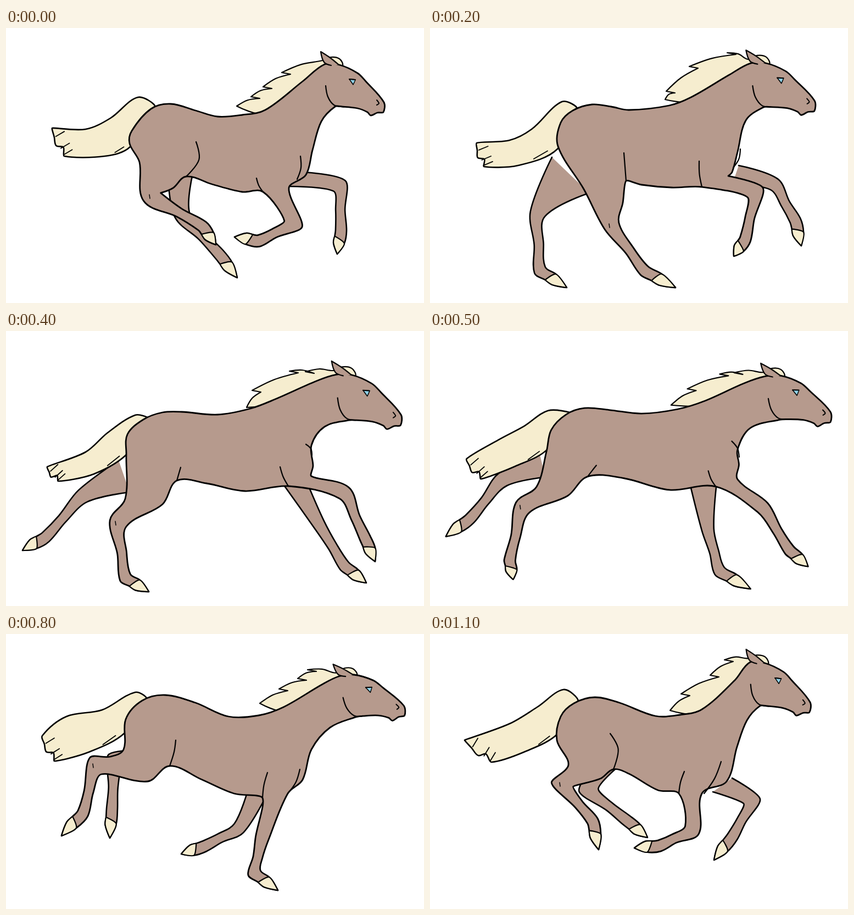
Animation, 761 px wide and 500 px high, one loop 1200 ms. Source, as an HTML page with a canvas:

```html
<!DOCTYPE html>
<html lang="en">
<head>
<meta charset="utf-8">
<title>Galloping horse</title>
<style>
html, body { margin: 0; width: 100%; height: 100%; overflow: hidden; background: #fff; }
canvas { display: block; }
</style>
</head>
<body>
<canvas id="stage" width="761" height="500"></canvas>
<script>
const COAT = '#b69a8d', CREAM = '#f6edcf', INK = '#000', IRIS = '#8fd3ea';
const STEPS = 12, STEP_MS = 100;
const ctx = document.getElementById('stage').getContext('2d');
const keys = [];

const nums = text => text.split(' ').map(Number);
const points = flat => flat.reduce((out, v, i) => (i % 2 ? out.at(-1).push(v) : out.push([v]), out), []);
const mix = (a, b, t) => [a[0] + (b[0] - a[0]) * t, a[1] + (b[1] - a[1]) * t];
const shift = (p, d, k = 1) => [p[0] + d[0] * k, p[1] + d[1] * k];
const gap = (a, b) => Math.hypot(b[0] - a[0], b[1] - a[1]) || 1;
const toward = (a, b) => [(b[0] - a[0]) / gap(a, b), (b[1] - a[1]) / gap(a, b)];
const side = d => [-d[1], d[0]];
const bulge = (a, b, t, k) => shift(mix(a, b, t), side(toward(a, b)), k);

// The head keeps its shape; each pose only places its poll and nose.
const POLL = [607, 67], NOSE = [688, 135];
const face = {
  outline: '599 143 612 143 640 146 658 153 664 159 676 154 687 153 688 135 655 97 640 82 607 67 580 66',
  ear: '592 68 579 62 573 43 590 54 606 67',
  forelock: '613 68 607 56 592 53 576 59',
  jaw: '582 105 586 125 597 140 612 143',
  eye: '625 93 636 94 632 103',
  nostril: '675 131 679 137 675 140'
};
for (const name in face) face[name] = points(nums(face[name]));

// hind: rump, buttock, gaskin, hock, fetlock, toe, gaskin front, stifle
// fore: elbow, knee, fetlock, toe, chest; far legs: root, joints, toe, root
function pose(step, parts) {
  for (const name in parts) parts[name] = nums(parts[name]);
  keys.push({ step, parts });
}

pose(0, {
  hind: '229 187 225 210 243 244 266 307 357 360 382 394 304 291 328 270',
  belly: '375 284 430 298',
  fore: '468 298 523 356 460 387 416 380 515 291',
  chest: '546 267 558 222 574 170', head: '607 67 688 135',
  top: '540 97 472 149 430 158 385 161 345 150 300 138 264 147',
  farHind: '296 285 321 340 387 410 421 454 340 265',
  farFore: '512 288 607 287 610 368 603 411 540 262',
  tail: '240 126 190 164 145 184 84 182 106 233 180 233 226 216',
  mane: '502 81 468 107 446 125 420 142',
  shoulder: '456 273', stifle: '346 207 14', brisket: '536 233 530 275'
});
pose(2, {
  hind: '238 172 233 215 280 293 331 360 390 441 447 472 351 318 357 278',
  belly: '385 285 440 290',
  fore: '495 289 592 299 574 384 553 415 543 269',
  chest: '550 262 560 225 575 168', head: '612 64 700 132',
  top: '545 85 475 126 435 141 362 149 330 143 295 139 260 150',
  farHind: '222 235 196 338 200 440 249 472 290 300',
  farFore: '550 285 626 284 665 350 676 396 562 250',
  tail: '240 134 185 184 145 204 85 209 98 252 160 250 232 220',
  mane: '541 45 472 70 430 115 428 130',
  shoulder: '490 242', stifle: '353 227 0', brisket: '565 220 552 254'
});
pose(4, {
  hind: '221 188 219 225 217 305 204 350 217 448 260 474 285 315 311 272',
  belly: '365 277 435 291',
  fore: '514 282 615 294 654 377 672 419 556 264',
  chest: '559 245 556 208 580 174', head: '630 80 719 152',
  top: '565 91 490 124 445 141 385 152 320 147 285 148 250 161',
  farHind: '205 235 140 300 72 375 30 399 225 293',
  farFore: '500 272 569 350 616 427 656 458 550 280',
  tail: '235 153 185 185 145 220 75 247 95 273 160 260 222 222',
  mane: '545 74 516 73 448 108 438 139',
  shoulder: '499 247', stifle: '318 248 0', brisket: '546 206 557 226'
});
pose(6, {
  hind: '222 168 208 210 180 256 151 287 100 378 70 422 228 283 272 256',
  belly: '345 260 435 287',
  fore: '518 286 580 352 623 422 668 440 557 278',
  chest: '562 245 563 225 585 178', head: '645 80 735 138',
  top: '575 98 510 130 455 144 385 148 335 138 280 129 247 139',
  farHind: '200 215 140 243 101 316 70 359 205 240',
  farFore: '450 280 447 363 435 430 492 464 492 280',
  tail: '200 131 160 158 105 171 60 210 90 259 150 229 208 205',
  mane: '560 73 533 83 488 103 441 129',
  shoulder: '509 260', stifle: '294 233 0', brisket: '553 202 562 242'
});
pose(8, {
  hind: '218 155 214 210 190 223 163 240 140 326 101 367 258 268 298 240',
  belly: '355 264 415 290',
  fore: '467 298 466 372 452 434 495 466 513 290',
  chest: '540 265 556 210 590 170', head: '633 74 724 130',
  top: '575 92 505 133 460 148 405 150 345 125 290 111 248 121',
  farHind: '220 212 198 232 193 318 189 371 225 245',
  farFore: '440 285 424 353 361 386 319 400 475 292',
  tail: '235 106 175 138 110 150 66 185 88 231 150 215 216 180',
  mane: '549 65 531 81 497 100 462 126',
  shoulder: '476 252', stifle: '309 193 2', brisket: '535 246 513 290'
});
pose(10, {
  hind: '232 140 221 183 239 234 206 262 235 343 229 395 300 263 322 243',
  belly: '355 261 410 287',
  fore: '442 294 448 361 388 399 345 423 481 300',
  chest: '530 287 553 222 577 172', head: '618 60 703 122',
  top: '565 83 495 136 455 150 392 151 345 127 295 113 262 120',
  farHind: '250 255 261 272 299 342 325 386 280 250',
  farFore: '482 298 519 347 454 391 408 402 525 280',
  tail: '243 98 195 130 145 155 52 177 102 221 165 209 222 180',
  mane: '541 41 510 82 458 108 445 142',
  shoulder: '453 248', stifle: '320 181 6', brisket: '521 242 481 302'
});
pose(11, {
  hind: '238 150 231 193 252 238 241 274 296 340 307 392 310 263 334 246',
  belly: '362 254 415 284',
  fore: '453 290 477 356 418 385 372 389 495 290',
  chest: '540 268 559 205 577 157', head: '610 53 692 124',
  top: '555 84 495 137 455 147 410 149 345 125 300 115 262 126',
  farHind: '285 255 289 284 357 338 396 370 338 245',
  farFore: '515 287 586 304 551 368 517 411 550 262',
  tail: '243 101 195 133 145 163 63 193 112 233 175 213 232 182',
  mane: '536 47 510 75 457 109 437 139',
  shoulder: '463 250', stifle: '328 181 12', brisket: '530 232 499 290'
});

const keyAt = i => keys[(i + keys.length) % keys.length];

function slope(i, name, j) {
  const prev = keyAt(i - 1), next = keyAt(i + 1);
  const span = (next.step - prev.step + STEPS) % STEPS;
  return (next.parts[name][j] - prev.parts[name][j]) / span;
}

// Steps between two key poses lie halfway along a cubic through the keys.
function partsAt(step) {
  const i = keys.findLastIndex(k => k.step <= step);
  const a = keyAt(i), b = keyAt(i + 1);
  if (a.step === step) return a.parts;
  const parts = {};
  for (const name in a.parts) {
    parts[name] = a.parts[name].map((v, j) =>
      (v + b.parts[name][j]) / 2 + (slope(i, name, j) - slope(i + 1, name, j)) / 4);
  }
  return parts;
}

// Contour of a leg below its root, from the joints and fixed thicknesses.
function limb(root, knee, fetlock, toe, kneeHalf) {
  const down = toward(root, knee), shin = toward(knee, fetlock), foot = toward(fetlock, toe);
  const pair = (p, d1, d2, half) => {
    const sum = [d1[0] + d2[0], d1[1] + d2[1]];
    const size = Math.hypot(...sum) || 1;
    const n = side([sum[0] / size, sum[1] / size]);
    const reach = half / Math.max(0.7, size / 2);
    return [shift(p, n, reach), shift(p, n, -reach)];
  };
  const tilt = 28 * Math.PI / 180, c = Math.cos(tilt), s = Math.sin(tilt);
  const sole = [foot[0] * c - foot[1] * s, foot[0] * s + foot[1] * c];
  const rows = [
    pair(knee, down, shin, kneeHalf),
    pair(mix(knee, fetlock, 0.55), shin, shin, 8.5),
    pair(fetlock, shin, foot, 10),
    pair(mix(fetlock, toe, 0.4), sole, sole, 11)
  ];
  const back = rows.map(r => r[0]), front = rows.map(r => r[1]).reverse();
  const heel = bulge(back[3], toe, 0.35, 4);
  return { contour: [...back, heel, toe, ...front], hoof: [back[3], heel, toe, front[0]] };
}

function farLimb(flat, kneeHalf) {
  const [a, knee, fetlock, toe, b] = points(flat);
  const leg = limb(mix(a, b, 0.5), knee, fetlock, toe, kneeHalf);
  return { contour: [a, ...leg.contour, b], hoof: leg.hoof };
}

function placeHead([poll, nose]) {
  const u = [NOSE[0] - POLL[0], NOSE[1] - POLL[1]], v = [nose[0] - poll[0], nose[1] - poll[1]];
  const len = u[0] ** 2 + u[1] ** 2;
  const re = (u[0] * v[0] + u[1] * v[1]) / len, im = (u[0] * v[1] - u[1] * v[0]) / len;
  const put = ([x, y]) => {
    const dx = x - POLL[0], dy = y - POLL[1];
    return [poll[0] + dx * re - dy * im, poll[1] + dx * im + dy * re];
  };
  return Object.fromEntries(Object.entries(face).map(([name, pts]) => [name, pts.map(put)]));
}

// Locks sweep back from the forelock, each with a notch behind its tip.
function maneShape(tips, head, top) {
  const out = [...head.forelock];
  tips.forEach((tip, i) => {
    out.push(bulge(out.at(-1), tip, 0.5, 4), tip);
    if (i < tips.length - 1) out.push(shift(tip, [16, 3]));
  });
  return [...out, shift(top[1], [8, 8]), shift(top[0], [8, 8]), shift(head.outline.at(-1), [18, 14])];
}

function tailShape(t, dock) {
  const [a, b] = [t[3], t[4]];
  const tip = [[0.3, 3], [0.58, 6], [0.72, -5]].map(([at, out]) => bulge(a, b, at, out));
  const inward = side(toward(a, b));
  const tufts = [0.3, 0.72, 0.95].map(at => [mix(a, b, at), shift(mix(a, b, at - 0.04), inward, -18)]);
  tufts.push([mix(t[5], t[6], 0.4), mix(t[5], t[6], 0.75).map((v, i) => v + i * -4)]);
  return { outline: [shift(dock, [8, -3]), ...t.slice(0, 4), ...tip, ...t.slice(4)], tufts };
}

// Smooth curve through the points; sharp turns stay sharp.
function curve(pts, closed) {
  const n = pts.length, at = i => pts[(i + n) % n];
  const tangent = i => {
    if (!closed && (i === 0 || i === n - 1)) return [0, 0];
    const p = at(i - 1), q = at(i), r = at(i + 1);
    const d = toward(p, q), e = toward(q, r);
    const k = Math.min(1, Math.max(0, d[0] * e[0] + d[1] * e[1] + 0.5)) / 3;
    return toward(p, r).map(v => v * k);
  };
  const path = new Path2D();
  path.moveTo(...pts[0]);
  for (let i = 0; i < (closed ? n : n - 1); i++) {
    const p = at(i), q = at(i + 1), len = gap(p, q);
    path.bezierCurveTo(...shift(p, tangent(i), len), ...shift(q, tangent((i + 1) % n), -len), ...q);
  }
  if (closed) path.closePath();
  return path;
}

function ink(pts, width, fill, closed) {
  const path = curve(pts, closed);
  if (fill) {
    ctx.fillStyle = fill;
    ctx.fill(path);
  }
  ctx.lineWidth = width;
  ctx.stroke(path);
}

function draw(parts) {
  const p = {};
  for (const name in parts) p[name] = points(parts[name]);
  const bow = parts.stifle[2];
  const [rump, buttock, gaskin, hock, hindFetlock, hindToe, shank, stifle] = p.hind;
  const [elbow, knee, foreFetlock, foreToe, breast] = p.fore;
  const hind = limb(mix(gaskin, shank, 0.5), hock, hindFetlock, hindToe, 14);
  const fore = limb(mix(elbow, breast, 0.5), knee, foreFetlock, foreToe, 12);
  const head = placeHead(p.head);
  const tail = tailShape(p.tail, p.top.at(-1));

  ctx.fillStyle = '#fff';
  ctx.fillRect(0, 0, 761, 500);
  ctx.strokeStyle = INK;
  ctx.lineCap = ctx.lineJoin = 'round';

  for (const leg of [farLimb(parts.farHind, 13), farLimb(parts.farFore, 11)]) {
    ink(leg.contour, 2.6, COAT);
    ink(leg.hoof, 2.2, CREAM, true);
  }
  ink(tail.outline, 2.6, CREAM, true);
  for (const tuft of tail.tufts) ink(tuft, 1.8);
  ink(maneShape(p.mane, head, p.top), 2.2, CREAM, true);

  ink([
    rump, buttock, gaskin, ...hind.contour, shank, stifle, ...p.belly,
    elbow, ...fore.contour, breast, ...p.chest, ...head.outline, ...p.top
  ], 2.8, COAT, true);
  ink(hind.hoof, 2.2, CREAM, true);
  ink(fore.hoof, 2.2, CREAM, true);
  ink(head.ear, 2.2, COAT);

  const flank = p.stifle[0], point = p.shoulder[0], [notch, crease] = p.brisket;
  ink(head.jaw, 2.2);
  ink([point, bulge(point, elbow, 0.5, 2), elbow], 2.2);
  ink([flank, bulge(flank, stifle, 0.45, -bow), stifle], 2.2);
  ink([notch, bulge(notch, crease, 0.5, -4), crease], 2.2);
  ink([shift(hock, [-5, -4]), shift(hock, [-4, 3])], 1.5);
  ink(head.nostril, 2);
  ink(head.eye, 1.5, IRIS, true);
  ink(head.eye.slice(0, 2), 2);
}

const stride = Array.from({ length: STEPS }, (_, step) => partsAt(step));
let shown = -1;

function tick() {
  const step = Math.floor(performance.now() / STEP_MS) % STEPS;
  if (step !== shown) draw(stride[shown = step]);
  requestAnimationFrame(tick);
}
tick();
</script>
</body>
</html>
```
